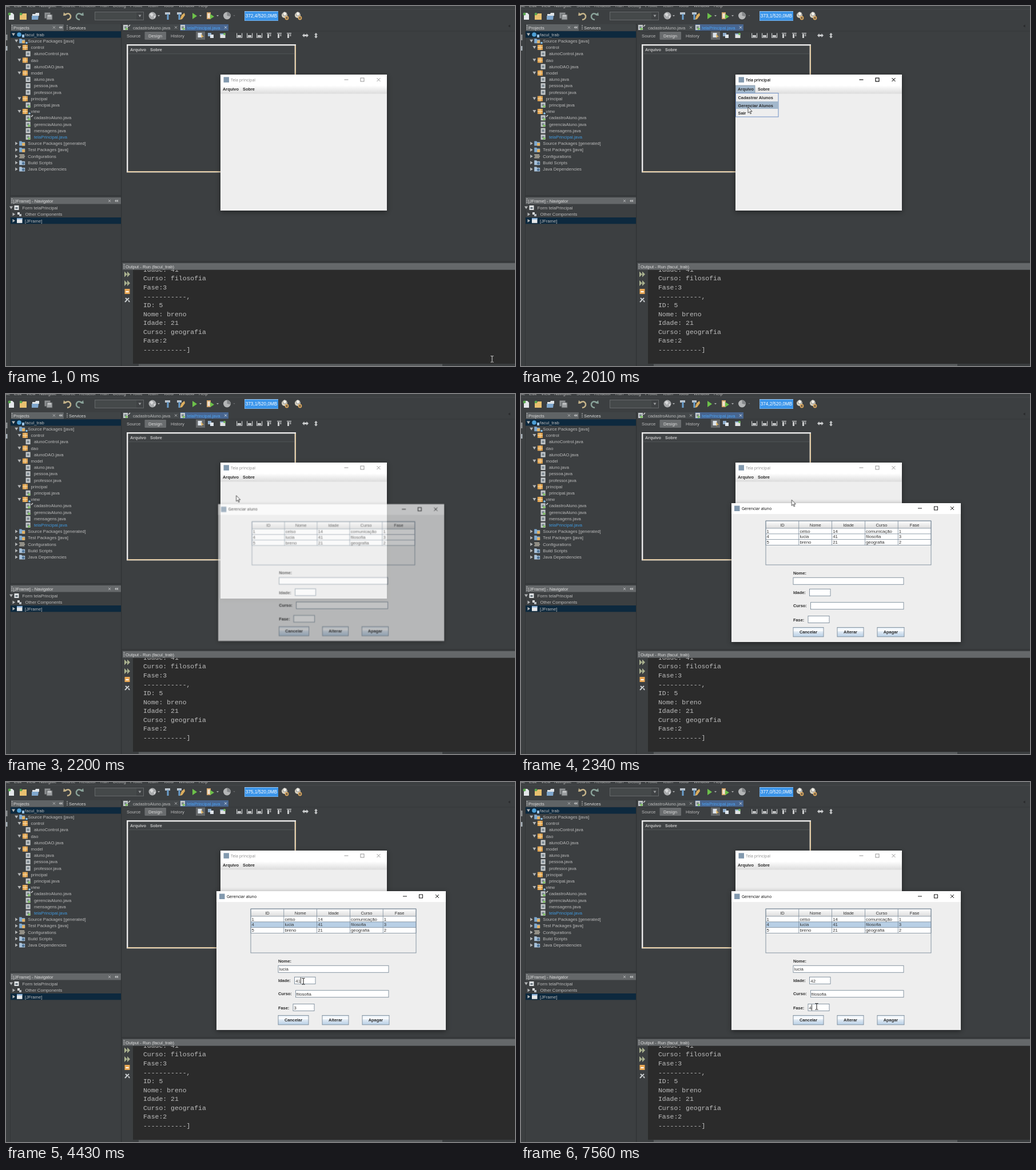
An HTML page for the animation above (8 s loop, 890 by 630 pixels).

```html
<!DOCTYPE html>
<html lang="pt">
<head>
<meta charset="utf-8">
<title>Gerenciar aluno</title>
<style>
html, body { margin: 0; width: 100%; height: 100%; overflow: hidden; background: #3c3f41; }
svg { display: block; width: 890px; height: 630px; }
text { font: 7.7px "Liberation Sans", Arial, sans-serif; fill: #bbb; white-space: pre; }
.b { font-weight: bold; font-size: 7.4px; fill: #2c2c2c; }
.cell { font-size: 7.8px; fill: #333; }
.head { font-size: 7.5px; fill: #333; text-anchor: middle; }
.mid { text-anchor: middle; }
.title { font: 7px "Open Sans", "Noto Sans", sans-serif; }
.mono { font: 11.45px "Liberation Mono", "Courier New", monospace; fill: #bdbdbd; }
.mem { font-size: 8.2px; fill: #fff; }
.win { filter: drop-shadow(0 2px 4px rgba(0, 0, 0, .45)); }
#popup { transform-origin: 568.5px 312.5px; animation: open 8s linear infinite; }
@keyframes open {
  0%, 25.99% { opacity: 0; transform: scale(.94); }
  26% { opacity: .1; transform: scale(.95); }
  26.875% { opacity: .47; transform: scale(.975); }
  28.4%, 100% { opacity: 1; transform: scale(1); }
}
</style>
</head>
<body>
<svg id="stage" viewBox="0 0 890 630">
<defs>
  <linearGradient id="bar" x2="0" y2="1"><stop stop-color="#fff"/><stop offset="1" stop-color="#dcdcdc"/></linearGradient>
  <linearGradient id="btn" x2="0" y2="1"><stop stop-color="#dde8f3"/><stop offset=".3" stop-color="#fff"/><stop offset=".5" stop-color="#dde8f3"/><stop offset="1" stop-color="#b8cfe5"/></linearGradient>
  <clipPath id="log"><rect x="222" y="462" width="668" height="164"/></clipPath>
</defs>
</svg>
<script>
const LOOP = 8000;
const pct = t => (t / LOOP * 100).toFixed(3) + '%';
let css = '', count = 0;

const R = (x, y, w, h, fill, more = '') => `<rect x="${x}" y="${y}" width="${w}" height="${h}" fill="${fill}" ${more}/>`;
const T = (x, y, s, cls = '', fill = '') => `<text x="${x}" y="${y}" class="${cls}" ${fill && `style="fill:${fill}"`}>${s}</text>`;
const P = (d, fill = 'none', stroke = 'none', w = 1, x = 0, y = 0) =>
  `<path d="${d}" fill="${fill}" stroke="${stroke}" stroke-width="${w}" transform="translate(${x} ${y})"/>`;
const C = (x, y, r, fill) => `<circle cx="${x}" cy="${y}" r="${r}" fill="${fill}"/>`;

// Shows content only during the given [from, to] spans.
function during(spans, content) {
  const name = 'on' + count++;
  const stops = spans[0][0] ? ['0%{opacity:0}'] : [];
  for (const [a, b] of spans) {
    stops.push(`${pct(a)}{opacity:1}`);
    if (b < LOOP) stops.push(`${pct(b)}{opacity:0}`);
  }
  css += `@keyframes ${name}{${stops.join('')}}`;
  return `<g style="animation:${name} 8s step-end infinite">${content}</g>`;
}

function along(path, content) {
  const stops = path.map(([t, x, y]) => `${pct(t)}{transform:translate(${x}px,${y}px)}`);
  css += `@keyframes path{${stops.join('')}}`;
  return `<g style="animation:path 8s linear infinite">${content}</g>`;
}

const down = (x, y) => P('M-3-2.5h6l-3 5z', '#b4b6b7', 'none', 1, x, y);
const right = (x, y) => P('M-2-3l4.5 3l-4.5 3z', '#b4b6b7', 'none', 1, x, y);
const close = (x, y, c = '#b8babb', s = 2) => P(`M${-s} ${-s}L${s} ${s}M${s} ${-s}L${-s} ${s}`, 'none', c, .9, x, y);
const drop = x => P('M-2-1h4l-2 2.5z', '#a8aaab', 'none', 1, x, 17);
const dots = (x, y) => P('M0-4v8', 'none', '#d0d0d0', 1.2, x, y).replace('/>', ' stroke-dasharray="1.5 1.5"/>');

function toolbar() {
  const menu = [['File', -5], ['Edit', 14], ['View', 35], ['Navigate', 58], ['Source', 97], ['Refactor', 128], ['Run', 165],
    ['Debug', 187], ['Profile', 217], ['Team', 247], ['Tools', 275], ['Window', 302], ['Help', 337]];
  const gear = x => C(x, 16, 5, '#d9d4c4') + P('M-3-3L0-5L4-3L3 2L-2 2z', '#f0eee6', '#6b6b6b', .7, x, 15) + C(x + 4, 21, 3.4, '#d3a15b') + C(x + 4, 21, 1.4, '#4a4a4a');
  return menu.map(([s, x]) => T(x, 2.4, s)).join('')
    + R(0, 5.5, 890, .7, '#4b4e50')
    + P('M5 12h6l3 3v9h-9z', '#e4e7ea') + C(6, 14, 2.4, '#5aa84f')
    + P('M24 15h4l1-2h7v11h-12z', '#e8c070') + C(26, 14, 2.3, '#5aa84f')
    + P('M46 14h5l1-2h6v5h-12z', '#dfe4e8') + P('M45 17h12l-1 7h-11z', '#7fa6cc')
    + R(67.5, 11.5, 10, 10, '#8d9092') + R(71, 15, 10, 9, '#9da0a2', 'stroke="#55585a"') + R(73, 15.5, 6, 3, '#c4c6c7')
    + P('M102 16q8-6 11 1q1 6-6 7', 'none', '#c6b48a', 2.5) + P('M100 17l1-6l5 5z', '#c6b48a')
    + P('M134 16q-8-6-11 1q-1 6 6 7', 'none', '#8aa39a', 2.5) + P('M136 17l-1-6l-5 5z', '#8aa39a')
    + R(155.5, 10.5, 85, 14, '#45494a', 'stroke="#65686a"') + R(228, 11, 12, 13, '#3f4244') + P('M-2.5-1.5h5l-2.5 4z', '#9a9c9e', 'none', 1, 234, 17)
    + C(256, 17, 6.5, '#a9abad') + P('M251 14l4-2l3 3l-3 4zM258 18l4-1l-2 5z', '#d8d9da') + drop(267)
    + R(278, 11, 9, 4, '#b9c3cc') + R(281.5, 14, 3, 10, '#6a9fce')
    + R(299, 11, 8, 4, '#b9c3cc') + R(301.5, 14, 3, 10, '#6a9fce') + P('M307 16l5-4l1 4l-5 7l-4 1z', '#dcae5f')
    + P('M326 12l8 5.5l-8 5.5z', '#6cc04a') + drop(340)
    + R(351, 11, 7, 12, '#d5a56a') + R(352.5, 13, 4, 8, '#f1e4d0') + P('M357 14l7 4.5l-7 4.5z', '#6cc04a') + drop(370)
    + C(386.5, 17, 6.5, '#b4b6b7') + P('M386.5 17v-6.5a6.5 6.5 0 0 1 6 8z', '#85888a') + P('M-1.5-1h3l-1.5 2z', '#6c6f71', 'none', 1, 399, 17)
    + R(417, 9, 59, 17, '#3b95ea') + R(417, 9, 59, 1, '#9cc7f0') + R(417, 25, 59, 1, '#77b3ec') + R(417, 10, 1, 15, '#77b3ec')
    + gear(487) + gear(510);
}

function memory() {
  const used = [['372,4', 0], ['373,1', 600], ['374,2', 2280], ['375,1', 4000], ['376,1', 5300], ['377,0', 6790]];
  return used.map(([s, a], i) => during([[a, used[i + 1]?.[1] ?? LOOP]], T(446.5, 20, s + '/520,0MB', 'mem mid'))).join('');
}

const icons = {
  p: (x, y) => C(x, y, 3.8, '#4d9fd6') + R(x + 5, y, 4, 5, '#9cc3e4'),
  f: (x, y) => P('M-5-4h4l1 1.5h5v6.5h-10z', '#7fa9cf', 'none', 1, x, y) + R(x, y - 1, 5, 5, '#e3b162'),
  k: (x, y) => R(x - 4.5, y - 4.5, 9, 9, '#e2a552') + P('M-4.5 0h9M0-4.5v9', 'none', '#f6dcae', 1, x, y),
  j: (x, y) => R(x - 4, y - 4.5, 8, 9, '#c6cacc') + R(x - 2, y - 2, 4, 4, '#7b8790'),
  w: (x, y) => icons.j(x, y) + P('M0 0l5 2.5l-5 2.5z', '#7cc05c', 'none', 1, x, y),
  c: (x, y) => P('M-5-2.5h9M-4 0h9M-5 2.5h9', 'none', '#c9c3b4', 1.3, x, y),
  b: (x, y) => P('M-5-4h4l1 1.5h5v6.5h-10z', '#a9c2da', 'none', 1, x, y) + C(x + 2, y + 1, 2.3, '#4f7396'),
};

function projects() {
  const rows = `p0facul_trab/f1Source Packages [java]/k2control/j3alunoControl.java/k2dao/j3alunoDAO.java/k2model/j3aluno.java/j3pessoa.java/j3professor.java/k2principal/w3principal.java/k2view/w3cadastroAluno.java/w3gerenciaAluno.java/j3mensagens.java/w3telaPrincipal.java/f1Source Packages [generated]/f1Test Packages [java]/c1Configurations/b1Build Scripts/b1Java Dependencies`.split('/');
  const tree = rows.map((row, i) => {
    const level = +row[1], y = 50 + i * 11.21, x = 23 + level * 5.2;
    const arrow = level > 2 ? '' : (level === 1 && i > 1 ? right : down)(13 + level * 5.2, y);
    const blue = row.includes('telaP') ? '#3f98dd' : '';
    return arrow + icons[row[0]](x, y) + T(33 + level * 5.3, y + 2.7, row.slice(2), '', blue);
  }).join('');
  return R(0, 31, 8, 599, '#3c3f41') + R(7, 31, 1, 599, '#323537') + R(201, 31, 1.2, 599, '#2f3234')
    + R(0, 50, 2.5, 10, '#8d9092') + R(0, 70, 2.5, 8, '#a9b3bb')
    + R(9, 32, 92, 11.5, '#606466') + R(102, 32, 99, 11.5, '#404446') + dots(10.5, 37.5) + T(13, 40.6, 'Projects', '', '#ddd')
    + close(84, 37.5) + P('M-3 0l3-2.5v5zM0 0l3-2.5v5z', '#b8babb', 'none', 1, 95.5, 37.5)
    + dots(107, 37.5) + T(110, 40.6, 'Services', '', '#ddd')
    + R(8, 44.2, 193, 11.3, '#0d293e') + tree
    + C(36, 64.5, 1.8, '#8cc6f0') + C(41, 188, 1.8, '#8cc6f0') + P('M44 194l3-3', 'none', '#ddd', 1.2)
    + R(8, 331.5, 193, 1, '#2f3234') + R(8, 335, 193, 11.5, '#65686a') + dots(10.5, 341) + T(12.5, 343.8, '[JFrame] - Navigator', '', '#ddd')
    + close(181, 341) + P('M-3 0l3-2.5v5zM0 0l3-2.5v5z', '#b8babb', 'none', 1, 193, 341)
    + down(9, 353) + R(14.5, 349, 8, 8, '#dfe2e4') + R(16.5, 352, 4, 3, '#6b7780') + T(28.5, 356, 'Form telaPrincipal')
    + right(13.5, 364.5) + R(20, 361, 4, 4, '#e2e4e6') + R(23, 364, 4, 4, '#b7bcc0') + T(33.5, 367.4, 'Other Components')
    + R(8, 370, 193, 11.3, '#0d293e') + right(13.5, 375.7) + R(19, 371.2, 9.5, 8.6, '#e6e8ea') + R(19, 371.2, 9.5, 2.2, '#7fa9d4') + T(33, 378.6, '[JFrame]');
}

function editor() {
  const align = [408, 426, 443, 460, 478, 495].map((x, i) => i < 3
    ? R(x - 5, 47.5, 1.2, 8, '#c9cbcc') + R(x + 4, 47.5, 1.2, 8, '#c9cbcc') + R(x - 3, 51, 6, 3.5, '#c9cbcc') + R(x - 5, 54.6, 10, 1, '#c9cbcc')
    : R(x - 4, 47, 8, 1.2, '#c9cbcc') + R(x - 3, 49, 3, 7, '#c9cbcc') + R(x + 1, 49, 2.5, 4, '#8f9294')).join('');
  return R(204, 32, 100, 11.5, '#45494b') + icons.w(209, 37.5) + P('M214 36l3-3', 'none', '#ddd', 1.2) + T(222, 40.5, 'cadastroAluno.java') + close(297, 37.5)
    + R(304.5, 32, 84.5, 11.5, '#47658f') + icons.w(309, 37.5) + T(316.5, 40.5, 'telaPrincipal.java', '', '#4da3f2') + close(384, 37.5, '#dfe6ee')
    + P('M881.5 32.5v5l-3.5-2.5z', '#292b2c') + R(204, 43.5, 686, 1, '#35383a')
    + T(211, 54.6, 'Source') + R(242.5, 45, 37.5, 14, '#696c6e', 'rx="1"') + T(249, 54.6, 'Design', '', '#ddd') + T(288, 54.6, 'History')
    + R(332, 44.5, 16, 14.5, '#65686a') + R(335.5, 47, 7, 8, '#dce3ea') + P('M341 49l5 5h-3l-1 3z', '#e3b45e')
    + R(353, 47, 6, 6, '#8eaccb') + R(357, 50, 6, 6, '#dfe5ec') + R(374.5, 48, 9, 8, '#e0e2e3') + R(374.5, 48, 9, 2, '#8bb0d6') + C(382, 49, 2, '#6fb657')
    + align
    + P('M518 51.5l3.5-3.5v2h4v-2l3.5 3.5l-3.5 3.5v-2h-4v2z', '#c9cbcc') + P('M542 47l3 3.2h-1.8v3h1.8l-3 3.2l-3-3.2h1.8v-3h-1.8z', '#c9cbcc')
    + R(212.2, 68.2, 293.6, 222, 'none', 'stroke="#ececec" stroke-width="2.4"') + P('M506 69v221H212', 'none', '#dcae62', 1)
    + R(214, 70, 290, 13.5, '#3f4244') + R(214, 83.3, 290, .8, '#55585a')
    + T(217, 79.2, 'Arquivo', 'b', '#c4c4c4') + T(252, 79.2, 'Sobre', 'b', '#c4c4c4');
}

function output() {
  const lines = ['Idade: 41', 'Curso: filosofia', 'Fase:3', '-----------,', 'ID: 5', 'Nome: breno', 'Idade: 21', 'Curso: geografia', 'Fase:2', '-----------]'];
  const twin = y => P('M-5-5l5 5l-5 5zM0-5l5 5l-5 5z', '#a9b18f', 'none', 1, 212, y);
  return R(202, 446.5, 688, 1.2, '#303335') + R(204, 450, 686, 11.5, '#65686a') + dots(206.5, 455.7) + T(209, 458.5, 'Output - Run (facul_trab)', '', '#ddd')
    + R(222, 462, 668, 164, '#2b2b2b') + R(222, 626, 668, 4, '#3a3d3f') + R(232, 626.6, 531, 3.4, '#595c5e')
    + twin(469.5) + twin(485) + R(207.5, 495, 9, 9, '#e8a755') + R(209.5, 499, 5, 2, '#fff')
    + P('M208 518l7-7M209 511l3 3M214 515l2 3', 'none', '#ccd0d2', 2)
    + `<g clip-path="url(#log)">${lines.map((s, i) => T(240, 464.9 + i * 15.57, s, 'mono')).join('')}</g>`;
}

const controls = (x, y, c) => P('M-3.5 0h7', 'none', c, .9, x, y) + R(x + 25, y - 3, 6, 6, 'none', `stroke="${c}" stroke-width=".9"`) + close(x + 56.5, y, c, 3);
const frameIcon = (x, y) => R(x, y, 9.5, 9.5, '#8299ae');

function mainWindow() {
  const item = (y, s) => T(379.5, y, s, 'b');
  const hover = y => R(376, y, 74, 13, '#a3b8cc');
  const bar = c => T(393, 131.7, 'Tela principal', 'title', c) + controls(595, 129, c);
  const menu = R(375.5, 152.5, 74.5, 41.5, '#eee', 'stroke="#6f8fc4"')
    + during([[1600, 1660]], hover(153.5)) + during([[1660, 2080]], hover(167))
    + item(163.2, 'Cadastrar Alunos') + item(176.5, 'Gerenciar Alunos') + item(189.7, 'Sair');
  return `<g class="win">${R(375, 120, 291, 238, '#eee')}</g>` + R(375, 120, 291, 19, '#fff') + frameIcon(380.5, 124.3)
    + bar('#8c8c8c') + during([[1220, 2080]], bar('#000'))
    + R(375, 139, 291, 14.5, 'url(#bar)')
    + during([[1290, 2080]], R(375.5, 139, 33.5, 13.5, '#a3b8cc', 'stroke="#7a8a99" stroke-width=".7"') + menu)
    + T(379, 148.2, 'Arquivo', 'b') + T(414, 148.2, 'Sobre', 'b');
}

function studentWindow() {
  const cols = [428, 485.8, 543.6, 601.4, 659.2], line = '#7a8a99', edge = `stroke="${line}" stroke-width=".9"`;
  const data = [['1', 'celso', '14', 'comunicação', '1'], ['4', 'lucia', '41', 'filosofia', '3'], ['5', 'breno', '21', 'geografia', '2']];
  const rowY = i => 235 + i * 9.8;
  const field = (x, y, w) => R(x, y, w, 12, '#fff', edge);
  const button = (x, w, s) => R(x, 408.5, w, 16.3, 'url(#btn)', edge) + T(x + w / 2, 419.3, s, 'b mid');
  const caret = (x, y) => R(x, y, .9, 10.5, '#222');
  const table = R(428, 222, 289, 77, '#eee') + R(428, 222, 289, 13, 'url(#bar)') + R(428, 235, 289, 29.4, '#fff')
    + during([[3400, LOOP]], R(428, rowY(1), 289, 9.8, '#b8cfe5'))
    + [222, 235, ...[1, 2, 3].map(rowY)].map(y => R(428, y - .4, 289, .8, line)).join('')
    + [...cols, 717].map(x => R(x - .4, 222, .8, 42.4, line)).join('')
    + R(428, 222, 289, 77, 'none', edge)
    + during([[3400, 4310]], R(486, rowY(1), 57.5, 9.7, 'none', 'stroke="#5372a8"'))
    + ['ID', 'Nome', 'Idade', 'Curso', 'Fase'].map((s, i) => T(cols[i] + 29, 231.5, s, 'head')).join('')
    + data.map((r, j) => r.map((s, i) => T(cols[i] + 1.6, rowY(j) + 7.6, s, 'cell')).join('')).join('');
  const form = T(476, 315.6, 'Nome:', 'b') + field(476, 321.3, 193) + T(476, 350.4, 'Idade:', 'b') + field(504.5, 341.3, 36.5)
    + T(476, 372.8, 'Curso:', 'b') + field(506.5, 364.7, 162.5) + T(476, 397.6, 'Fase:', 'b') + field(502, 388.5, 37)
    + button(476, 53, 'Cancelar') + button(553, 46, 'Alterar') + button(623, 47, 'Apagar');
  const typed = during([[3470, LOOP]], T(477.7, 330.4, 'lucia', 'cell') + T(507.5, 373.7, 'filosofia', 'cell'))
    + during([[3470, 5240]], T(506.3, 350.5, '41', 'cell')) + during([[5240, 5370]], T(506.3, 350.5, '4', 'cell'))
    + during([[5370, LOOP]], T(506.3, 350.5, '42', 'cell'))
    + during([[3470, 7440]], T(503.6, 397.5, '3', 'cell')) + during([[7560, LOOP]], T(503.6, 397.5, '4', 'cell'))
    + during([[4310, 4810], [5370, 5870]], caret(515.1, 342)) + during([[5240, 5370]], caret(510.8, 342))
    + during([[6540, 7040], [7560, LOOP]], caret(508.1, 389.3)) + during([[7440, 7560]], caret(503.7, 389.3));
  return `<g id="popup"><g class="win">${R(368, 191, 401, 243, '#eee')}</g>` + R(368, 191, 401, 19, '#fff') + frameIcon(373, 195.5)
    + T(386, 202.8, 'Gerenciar aluno', 'title', '#000') + controls(697.5, 200, '#000') + table + form + typed + '</g>';
}

function pointer() {
  const beam = c => P('M-2.5-5.5h1.8l.7.7l.7-.7h1.8M0-5v9.5M-2.5 5.2h1.8l.7-.7l.7.7h1.8', 'none', c, 1);
  const path = [[0, 850, 618], [80, 850, 618], [300, 785, 542], [460, 645, 380], [620, 510, 230], [850, 432, 158],
    [920, 428, 156], [1150, 396, 148], [1440, 394, 148], [1590, 395, 152], [1690, 397, 177], [2190, 397, 177],
    [2340, 473, 185], [2560, 515, 232], [2710, 519, 246], [2780, 519, 246], [3300, 522.5, 251.5], [3720, 522.5, 251.5],
    [3900, 545, 288], [4100, 530, 340], [4250, 520, 349], [5870, 520, 349], [6150, 519, 375], [6400, 517, 393], [LOOP, 517, 393]];
  return along(path,
    during([[1220, 1290], [1940, 2010], [3400, 3470], [4290, 4360], [6480, 6550]], '<circle r="8" fill="#e8dc3c" opacity=".8"/>')
    + during([[0, 390]], beam('#dcdcdc'))
    + during([[390, 4120], [5930, 6300]], P('M0 0v10.2l2.4-2.2l1.7 3.8l1.5-.7l-1.7-3.7h3.2z', '#fff', '#222', .8))
    + during([[4120, 5930], [6300, LOOP]], beam('#111')));
}

document.getElementById('stage').insertAdjacentHTML('beforeend',
  R(0, 0, 890, 630, '#3c3f41') + toolbar() + memory() + projects() + editor() + output() + mainWindow() + studentWindow() + pointer());
const sheet = document.createElement('style');
sheet.textContent = css;
document.head.append(sheet);
</script>
</body>
</html>
```
